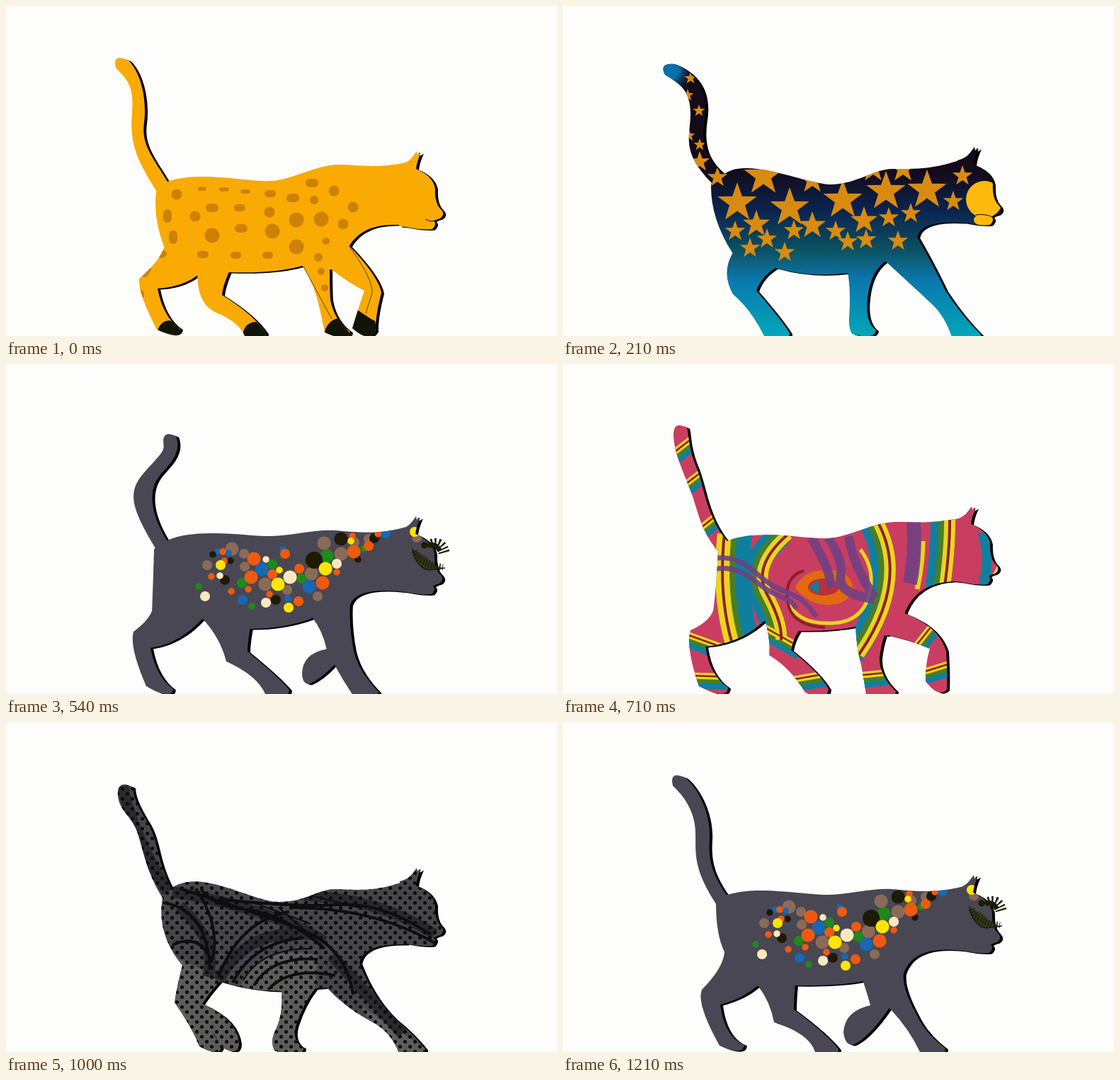
Recreate the animation shown at these times as an HTML page without scripts. Size 778 by 466 pixels, loop 1250 ms.

```html
<!DOCTYPE html>
<html lang="en">
<head>
<meta charset="utf-8">
<title>Walking cat</title>
<style>
html, body { margin: 0; height: 100%; overflow: hidden; background: #fdfdfc; }
svg { display: block; width: 778px; height: 466px; }

/* Walk: poses are joined in 24 fps steps */
.tail, .body, .head, .hindA, .hindB, .foreA, .foreB, .near, .far {
  animation: 1.25s steps(4) -4ms infinite;
}
.tail { animation-name: tail; }
.body { animation-name: body; }
.head { animation-name: head; }
.hindA { animation-name: hindA; }
.hindB { animation-name: hindB; }
.foreA { animation-name: foreA; }
.foreB { animation-name: foreB; }
.near { animation-name: near; animation-timing-function: steps(5); }
.far { animation-name: far; animation-timing-function: steps(5); }

@keyframes tail {
  0%, 80% { animation-timing-function: steps(5); }
  56.667% { animation-timing-function: steps(7); }
  0% { d: path("M214 264C180 210 175 190 178 150S170 104 155 87Q150 66 173 77C192 96 199 135 195 165S205 210 229 250Z"); }
  16.667% { d: path("M212 252C165 205 180 185 180 152S165 110 144 97Q135 80 158 82C190 96 206 120 200 160S205 222 233 242Z"); }
  30% { d: path("M212 256C178 205 172 178 190 150S212 118 206 104Q203 86 224 95C232 110 226 130 214 148S198 200 222 240Z"); }
  43.333% { d: path("M212 262C175 200 170 180 198 150S223 122 222 108Q223 94 240 102C248 122 235 138 220 154S196 200 229 252Z"); }
  56.667% { d: path("M218 264C196 235 192 215 184 190S155 125 156 98Q157 80 175 90C178 100 176 115 188 145S202 215 233 252Z"); }
  80% { d: path("M222 250C200 215 196 190 187 160S156 125 158 98Q160 82 179 92C180 105 184 115 200 142S212 195 234 236Z"); }
  96.667%, 100% { d: path("M218 260C182 205 188 185 187 155S170 104 155 90Q150 68 173 79C195 98 209 135 207 165S210 215 233 247Z"); }
}
@keyframes body {
  0%, 80% { animation-timing-function: steps(5); }
  56.667% { animation-timing-function: steps(7); }
  0% { d: path("M212 262Q220 250 228 248C270 232 345 249 375 247S440 224 468 224S520 230 565 221L565 310Q505 303 484 340L480 372L457 372L418 367Q380 378 315 376L270 380L225 345Q207 300 212 262Z"); }
  16.667% { d: path("M209 252Q215 243 225 240C255 209 345 253 380 252S440 230 465 230S520 232 565 216L565 306Q503 302 500 328L490 365L455 361L402 377Q350 384 300 370L270 375L240 350Q208 300 209 252Z"); }
  30% { d: path("M209 257Q213 242 222 238C262 201 340 249 390 248S440 240 465 240S525 248 565 229L565 320Q500 318 497 342L485 365L453 365L400 376Q370 376 330 374L277 348L217 350Q205 300 209 257Z"); }
  43.333% { d: path("M209 262Q217 250 228 249C270 230 345 244 375 243S440 233 465 235S525 242 565 230L565 322Q495 314 486 340L480 365L432 358L430 360Q390 374 345 374L277 360L206 352Q208 300 209 262Z"); }
  56.667% { d: path("M219 264Q222 252 232 250C275 232 345 248 375 246S440 223 470 223S520 226 565 217L565 307Q503 303 483 350L482 365L457 384L413 371Q380 378 332 377L285 363L212 350Q217 310 219 264Z"); }
  80% { d: path("M221 249Q225 238 233 235C275 205 345 254 385 254S440 236 465 236S520 242 565 224L565 314Q503 312 499 342L490 380L455 375L390 380Q345 380 300 366L272 375L250 345Q212 300 221 249Z"); }
  96.667%, 100% { d: path("M216 257Q222 246 232 244C275 230 345 245 375 244S440 234 465 236S525 243 565 232L565 323Q495 314 481 355L478 380L440 380L423 366Q390 373 327 372L274 373L228 325Q216 300 216 257Z"); }
}
@keyframes head {
  0%, 80% { animation-timing-function: steps(5); }
  56.667% { animation-timing-function: steps(7); }
  0% { transform: translate(0, 0); }
  16.667% { transform: translate(1px, -6px); }
  30% { transform: translate(1px, 7px); }
  43.333% { transform: translate(-1px, 10px); }
  56.667% { transform: translate(-3px, -4px); }
  80% { transform: translate(0, 1px); }
  96.667%, 100% { transform: translate(0, 11px); }
}
@keyframes hindA {
  0%, 80% { animation-timing-function: steps(5); }
  56.667% { animation-timing-function: steps(7); }
  0% { d: path("M270 376Q270 425 300 434Q330 448 337 466Q367 476 367 462Q350 436 305 408Q306 396 315 375Z"); }
  16.667% { d: path("M242 345Q222 375 240 407Q265 428 284 466Q320 476 320 462Q310 445 273 402Q280 382 300 370Z"); }
  30% { d: path("M217 345Q210 375 201 398Q224 430 238 466Q272 476 272 460Q246 442 232 402Q262 385 277 346Z"); }
  43.333% { d: path("M207 345Q204 360 180 378Q174 400 198 455Q234 476 236 459Q212 442 204 401Q245 395 277 360Z"); }
  56.667% { d: path("M214 340Q212 362 180 376Q173 400 192 455Q232 476 233 457Q207 440 201 399Q250 395 285 362Z"); }
  80% { d: path("M250 340Q242 370 248 396Q290 425 303 458Q328 474 329 454Q326 420 277 398Q285 385 302 366Z"); }
  96.667%, 100% { d: path("M273 370Q292 392 298 424Q348 440 356 466Q389 476 389 462Q372 440 326 406Q326 390 328 371Z"); }
}
@keyframes hindB {
  0%, 80% { animation-timing-function: steps(5); }
  56.667% { animation-timing-function: steps(7); }
  0% { d: path("M225 335Q220 358 188 385Q186 405 213 457Q244 471 246 456Q222 440 214 399Q250 397 272 379Z"); }
  16.667% { d: path("M242 345Q222 375 240 407Q265 428 284 466Q320 476 320 462Q310 445 273 402Q280 382 300 370Z"); }
  30% { d: path("M276 346Q290 375 291 402Q335 425 343 455Q374 474 375 456Q370 433 321 396Q322 386 331 374Z"); }
  43.333% { d: path("M276 358Q302 385 311 420Q355 440 366 466Q400 476 400 460Q385 442 341 406Q341 394 345 372Z"); }
  56.667% { d: path("M285 362Q293 385 291 411Q322 430 342 464Q374 476 375 459Q362 436 322 404Q324 390 334 375Z"); }
  80% { d: path("M250 340Q242 370 238 396Q262 430 273 458Q303 474 304 458Q288 435 272 400Q280 385 300 366Z"); }
  96.667%, 100% { d: path("M228 325Q226 348 196 378Q188 398 221 457Q254 472 256 456Q228 445 222 399Q255 390 274 373Z"); }
}
@keyframes foreA {
  0%, 80% { animation-timing-function: steps(5); }
  56.667% { animation-timing-function: steps(7); }
  0% { d: path("M457 370Q485 392 506 402Q498 425 489 455Q512 476 522 459Q521 440 530 405Q526 382 484 338Z"); }
  16.667% { d: path("M455 360Q490 392 524 424Q540 440 550 470Q590 476 590 464Q565 440 540 402Q525 370 500 326Z"); }
  30% { d: path("M453 364Q478 395 493 418Q518 435 532 468Q574 476 573 464Q545 432 528 412Q518 375 497 340Z"); }
  43.333% { d: path("M430 355Q447 375 453 404Q470 438 490 468Q526 476 526 463Q498 435 491 405Q484 370 486 338Z"); }
  56.667% { d: path("M413 368Q414 400 421 425Q425 445 428 468Q470 476 470 462Q446 440 447 415Q449 395 457 375Z"); }
  80% { d: path("M389 376Q392 410 382 432Q372 450 379 464Q420 476 420 460Q404 452 409 430Q420 395 440 372Z"); }
  96.667%, 100% { d: path("M423 364Q430 385 434 400Q398 408 396 438Q398 456 409 456Q430 448 460 405Q470 390 475 350Z"); }
}
@keyframes foreB {
  0%, 80% { animation-timing-function: steps(5); }
  56.667% { animation-timing-function: steps(7); }
  0% { d: path("M418 366Q436 395 441 420Q446 440 450 461Q484 476 486 460Q464 445 458 415Q457 400 457 360Z"); }
  16.667% { d: path("M401 370Q407 400 404 440Q403 455 408 463Q440 472 442 458Q426 446 430 412Q434 375 456 360Z"); }
  30% { d: path("M400 370Q406 400 396 425Q386 440 388 460Q424 472 425 457Q406 450 413 430Q428 378 453 364Z"); }
  43.333% { d: path("M440 355Q452 385 455 402Q418 408 418 438Q419 452 428 452Q445 445 465 423Q480 400 480 345Z"); }
  56.667% { d: path("M455 382Q490 390 518 402Q512 420 512 448Q530 472 542 460Q543 440 541 405Q530 370 482 352Z"); }
  80% { d: path("M450 372Q480 405 520 425Q545 440 555 468Q592 476 592 462Q575 440 550 420Q518 390 499 340Z"); }
  96.667%, 100% { d: path("M425 365Q440 395 462 405Q490 435 505 468Q540 476 540 461Q512 440 500 415Q478 375 481 355Z"); }
}
@keyframes near { 16.667% { transform: translateX(-42px); } }
@keyframes far { 16.667% { transform: translateX(72px); } }

/* Coats: hard cuts */
.coat { visibility: hidden; animation: 1.25s step-end -4ms infinite; }
.gold { animation-name: gold; }
.night { animation-name: night; }
.pink { animation-name: pink; }
.grey { animation-name: grey; }
.candy { animation-name: candy; }
.ink { animation-name: ink; }
@keyframes gold { 0% { visibility: visible; } 13.333% { visibility: hidden; } }
@keyframes night { 13.333% { visibility: visible; } 26.667% { visibility: hidden; } }
@keyframes pink { 26.667% { visibility: visible; } 40% { visibility: hidden; } }
@keyframes grey { 40%, 93.333% { visibility: visible; } 53.333% { visibility: hidden; } }
@keyframes candy { 53.333% { visibility: visible; } 70% { visibility: hidden; } }
@keyframes ink { 70% { visibility: visible; } 93.333% { visibility: hidden; } }

.line { fill: none; }
.dots { fill: none; stroke-linecap: round; }
.l { stroke-width: 19; } .m { stroke-width: 14; } .s { stroke-width: 9.5; }
.stars { marker: url(#star); fill: none; }
.hashes { marker: url(#hash); fill: none; }
</style>
</head>
<body>
<svg viewBox="0 0 778 466">
<defs>
  <clipPath id="cat">
    <path class="tail"/><path class="body"/>
    <path class="hindA"/><path class="hindB"/><path class="foreA"/><path class="foreB"/>
    <path class="head" d="M556 224Q568 221 574 213L580 205 581 210 586 207Q580 220 579 230Q603 240 606 258Q605 276 612 285Q622 294 613 300Q605 302 604 304Q609 308 602 315Q590 317 565 312L555 311Z"/>
  </clipPath>
  <clipPath id="low"><rect y="380" width="778" height="86"/></clipPath>
  <rect id="sheet" width="778" height="466"/>
  <linearGradient id="dusk" x2="0" y2="1">
    <stop offset=".5" stop-color="#140a1a"/><stop offset=".62" stop-color="#0a2450"/>
    <stop offset=".74" stop-color="#0b5262"/><stop offset=".83" stop-color="#0a78ad"/>
    <stop offset="1" stop-color="#04a5b9"/>
  </linearGradient>
  <radialGradient id="tip"><stop offset=".35" stop-color="#0a70a8"/><stop offset="1" stop-color="#140a1a" stop-opacity="0"/></radialGradient>
  <marker id="star" overflow="visible" markerWidth="1" markerHeight="1">
    <path fill="#d88b10" d="M0-1L.24-.32.95-.31.38.12.59.81 0 .4-.59.81-.38.12-.95-.31-.24-.32Z"/>
  </marker>
  <marker id="hash" overflow="visible" markerWidth="1" markerHeight="1">
    <path stroke="#8a0d10" stroke-width=".27" d="M-.36-1V1M.36-1V1M-1-.36H1M-1 .36H1"/>
  </marker>
  <pattern id="mesh" width="14" height="14" patternUnits="userSpaceOnUse">
    <path class="dots" stroke="#0b0b0c" stroke-width="5" d="M3.500 3.500h.1M10.500 10.500h.1"/>
  </pattern>
  <path id="rump" d="M228 240Q218 330 242 405"/>
  <path id="bands" d="M318 240Q266 285 288 325T308 390M438 212Q494 300 418 410M546 210Q547 260 538 320"/>
  <path id="rings" d="M150 130l36-28M166 175l34-26M190 235l30-24M175 382l50 18M180 440l60 2M285 372l50 28M310 448l70-12M415 440l60-6M495 402l32-40M505 436l45-14"/>
</defs>

<g transform="translate(4 1.500)"><use href="#sheet" clip-path="url(#cat)"/></g>

<g clip-path="url(#cat)">
  <g class="coat gold">
    <use href="#sheet" fill="#f9ab04"/>
    <g class="dots" stroke="#cc8205">
      <path stroke-width="21" d="M291 324h.1M410 302h.1M376 318h.1M410 340h.1M445 301h.1"/>
      <path stroke-width="15" d="M476 308h.1M241 266h.1M463 261h.1M490 284h.1M267 297h.1M372 291h.1"/>
      <path stroke-width="12" d="M435 274h.1M441 355h.1M402 271h6M429 250h6M288 285h6M329 314h6M228 293v7M236 323v7"/>
      <path stroke-width="10" d="M452 332h.1M445 375h.1M450 398h.1M275 351h6M322 352h5M367 352h5M327 285h6M370 265h6M196 378l4-6M219 351l3-1M190 406v3"/>
      <path stroke-width="5.500" d="M274 258h6M304 259h8M334 262h8"/>
    </g>
    <g class="near" fill="#111409">
      <path d="M334 470Q334 447 353 446L380 470ZM448 470Q450 446 468 441L492 470Z"/>
      <path class="line" stroke="#3a2a04" stroke-width=".8" d="M420 368L460 442"/>
    </g>
    <g class="far" fill="#111409">
      <path d="M212 470Q214 445 230 444Q244 445 250 470ZM484 470Q488 432 496 429Q512 440 521 445L526 470Z"/>
      <path class="line" stroke="#3a2a04" stroke-width=".8" d="M485 340Q518 385 517 405L508 434"/>
    </g>
    <path class="line" stroke="#111" d="M592 301l7 3 7-1"/>
  </g>

  <g class="coat night">
    <use href="#sheet" fill="url(#dusk)"/>
    <circle cx="150" cy="90" r="38" fill="url(#tip)"/>
    <path class="stars" stroke-width="29" d="M246 278L320 285 395 274 456 262 514 260 283 240"/>
    <path class="stars" stroke-width="20" d="M273 308L352 310 425 303 352 246 480 230 438 230"/>
    <path class="stars" stroke-width="15" d="M243 318L288 329 264 342 313 348 326 317 385 318 402 333 428 330 460 299 491 293 473 332 551 276 564 240 193 220 218 242"/>
    <path class="stars" stroke-width="9" d="M192 148L180 102 176 126 178 183 193 196"/>
    <circle cx="595" cy="273" r="26" fill="#fdb90c"/>
    <ellipse cx="596" cy="302" rx="16" ry="9" fill="#fdb90c"/>
    <path class="line" stroke="#111" d="M583 295q12-2 24 3"/>
  </g>

  <g class="coat pink">
    <use href="#sheet" fill="#fc6a70"/>
    <path class="foreB" fill="#fdfdfc" clip-path="url(#low)"/>
    <g fill="#c0ae6c">
      <path d="M203 124L219 138 235 180 222 240 210 258 165 240 170 150Z"/>
      <ellipse cx="384" cy="254" rx="36.500" ry="37"/>
      <path d="M484 235H523Q517 280 528 325L505 335Q486 290 484 235Z"/>
    </g>
    <path fill="#d9620e" d="M356 235h58v19h-58Z"/>
    <g class="line" stroke="#86694c" stroke-width="4">
      <path stroke-width="18" stroke-dasharray="3.500 6" d="M191 152Q182 180 190 205T213 250"/>
      <path d="M506 244Q506 280 520 303"/>
      <path fill="#86694c" stroke="none" d="M492 278L513 325 503 331Q493 305 492 278Z"/>
    </g>
    <g fill="#26c0b2" stroke="#1da2a8" stroke-width="2.500">
      <circle cx="467" cy="297" r="16"/><circle cx="447" cy="304" r="16"/>
      <circle cx="474" cy="318" r="16"/><circle cx="453" cy="325" r="15"/>
      <ellipse cx="461" cy="311" rx="24" ry="16" transform="rotate(35 461 311)"/>
    </g>
    <path class="hashes" stroke-width="16" d="M283 310h0"/>
    <path class="hashes" stroke-width="13" d="M231 276L354 298 356 364 222 371"/>
    <path class="hashes" stroke-width="9.500" d="M282 240L442 272 424 314 393 338"/>
    <path class="hashes" stroke-width="6" d="M433 365L482 338 492 361"/>
    <path class="line" stroke="#4b3a10" stroke-width="7" d="M482 387h30M489 399.500h30M497 413h34"/>
    <path d="M570 238Q592 246 612 266L608 274Q598 253 580 254 574 248 570 238Z"/>
  </g>

  <g class="coat grey">
    <use href="#sheet" fill="#494753"/>
    <g class="dots">
      <g stroke="#8a6b58">
        <path class="l" d="M319 261h.1M366 311h.1M431 296h.1M449 253h.1M473 268h.1"/>
        <path class="m" d="M284 284h.1M336 268h.1M337 286h.1M397 319h.1M440 328h.1M512 247h.1M580 245h.1M492 252h.1"/>
      </g>
      <g stroke="#1668b4">
        <path class="l" d="M361 290h.1M428 314h.1"/>
        <path class="m" d="M334 333h.1M536 239h.1"/>
        <path class="s" d="M398 331h.1M314 267h.1M299 265h.1M391 262h.1"/>
      </g>
      <g stroke="#1f8a1a">
        <path class="l" d="M453 271h.1"/>
        <path class="m" d="M333 309h.1M376 283h.1M417 303h.1"/>
        <path class="s" d="M272 314h.1M347 342h.1M505 261h.1"/>
      </g>
      <g stroke="#1e1a04">
        <path class="l" d="M473 247h.1"/>
        <path stroke-width="24" d="M435 277h.1"/>
        <path class="m" d="M309 305h.1M381 333h.1M520 246h.1"/>
        <path class="s" d="M292 269h.1M317 278h.1M497 276h.1M591 256h.1"/>
      </g>
      <g stroke="#ee5a0e">
        <path class="l" d="M350 275h.1M346 301h.1M447 309h.1M491 265h.1"/>
        <path class="m" d="M394 268h.1M376 297h.1M414 289h.1M413 335h.1M512 257h.1"/>
        <path class="s" d="M290 300h.1M306 265h.1M318 321h.1M342 318h.1M372 325h.1M467 294h.1M489 243h.1M525 240h.1M308 278h.1"/>
      </g>
      <g stroke="#fbe8bd">
        <path class="l" d="M401 301h.1"/>
        <path class="m" d="M281 328h.1M367 337h.1M467 282h.1"/>
        <path class="s" d="M302 299h.1M367 276h.1"/>
      </g>
      <g stroke="#ffe500">
        <path class="l" d="M384 311h.1M451 289h.1"/>
        <path class="m" d="M303 284h.1M399 344h.1M577 237h.1"/>
        <path class="s" d="M386 291h.1M487 250h.1"/>
      </g>
    </g>
  </g>

  <g class="coat candy">
    <use href="#sheet" fill="#c93e60"/>
    <g class="line">
      <g stroke="#0f7fa0"><use href="#rump" x="16" stroke-width="46"/><use href="#bands" x="-10" stroke-width="34"/><use href="#rings" y="8" stroke-width="20"/></g>
      <g stroke="#4a7d28"><use href="#rump" x="5" stroke-width="26"/><use href="#bands" x="-5" stroke-width="22"/><use href="#rings" y="4" stroke-width="12"/></g>
      <g stroke="#ead51e"><use href="#rump" stroke-width="20"/><use href="#bands" stroke-width="16"/><use href="#rings" stroke-width="9"/></g>
      <g stroke="#8c2028" stroke-width="4"><use href="#rump"/><use href="#bands"/><use href="#rings" stroke-width="2.500"/></g>
      <path stroke="#ead51e" stroke-width="7" d="M508 250Q508 280 500 318"/>
      <path stroke="#0f7fa0" stroke-width="14" d="M592 238Q604 270 594 312"/>
      <path stroke="#ead51e" stroke-width="8" d="M604 312L620 280"/>
    </g>
    <rect x="316" y="280" width="112" height="88" rx="42" fill="#c93e60"/>
    <path class="line" stroke="#ead51e" stroke-width="5" d="M318 335Q330 368 380 366T435 310Q437 285 420 262"/>
    <path class="line" stroke="#8c2028" stroke-width="4" d="M340 292Q312 300 317 335T370 372"/>
    <path fill="#e3690f" d="M327 316Q340 292 368 291Q404 290 409 312Q408 338 378 340Q350 342 327 316Z"/>
    <ellipse cx="368" cy="315" rx="22" ry="12" fill="#b83238"/>
    <path fill="#0f7fa0" d="M347 315l14-10v20Z"/>
    <g class="line" stroke="#714184" stroke-opacity=".9">
      <path stroke-width="7" d="M216 274C260 270 270 300 300 315S335 325 358 357M216 289C260 285 270 312 300 325S320 335 330 345"/>
      <path stroke-width="13" d="M350 245Q378 290 378 315M374 245Q396 275 392 300T440 332M403 243Q410 285 440 330"/>
      <path stroke-width="20" d="M495 222Q498 270 490 310"/>
    </g>
  </g>

  <g class="coat ink">
    <use href="#sheet" fill="#46464a"/>
    <path fill="#5c5c5b" d="M235 330L300 360 340 470H220ZM330 375Q360 310 440 330L430 470H370ZM500 400l100 66h-60Z"/>
    <path class="line" stroke="#29292f" stroke-width="16" d="M165 90Q175 150 228 240M235 240Q380 265 450 310M300 365Q340 290 430 300M420 245Q530 250 605 300M245 260Q300 310 285 360M460 330L560 440"/>
    <use href="#sheet" fill="url(#mesh)"/>
    <g class="line" stroke="#0e0e10" stroke-width="4">
      <path d="M245 235Q340 265 410 290T490 385M300 250Q410 262 470 258T600 300M275 235Q290 260 340 265T450 320M400 262Q520 262 605 312M222 255Q285 265 288 350M268 235Q305 290 290 340M235 315Q265 300 285 325"/>
      <path d="M300 360Q330 280 400 268M320 368Q350 310 420 305M350 372Q375 330 440 335M370 378Q400 345 465 358"/>
      <path stroke-width="2" d="M335 365Q360 320 430 320M385 262L440 310M350 255L430 285M430 245L500 262"/>
    </g>
  </g>
</g>

<g class="coat grey">
  <path fill="#2c2f0c" d="M574 262Q577 280 590 291L619 289Q600 282 594 272Z" opacity=".75"/>
  <g class="line" stroke="#1b1d06">
    <path stroke-width="1.500" d="M574 260Q576 285 598 291L620 288"/>
    <path stroke-width="9" stroke-dasharray="1.500 2.500" d="M577 264Q582 283 617 287"/>
    <path stroke-width="16" stroke-dasharray="2 2.500" d="M601 255Q615 250 619 268"/>
    <path stroke-width="7" d="M596 257Q606 252 613 264"/>
  </g>
</g>
</svg>
</body>
</html>
```
